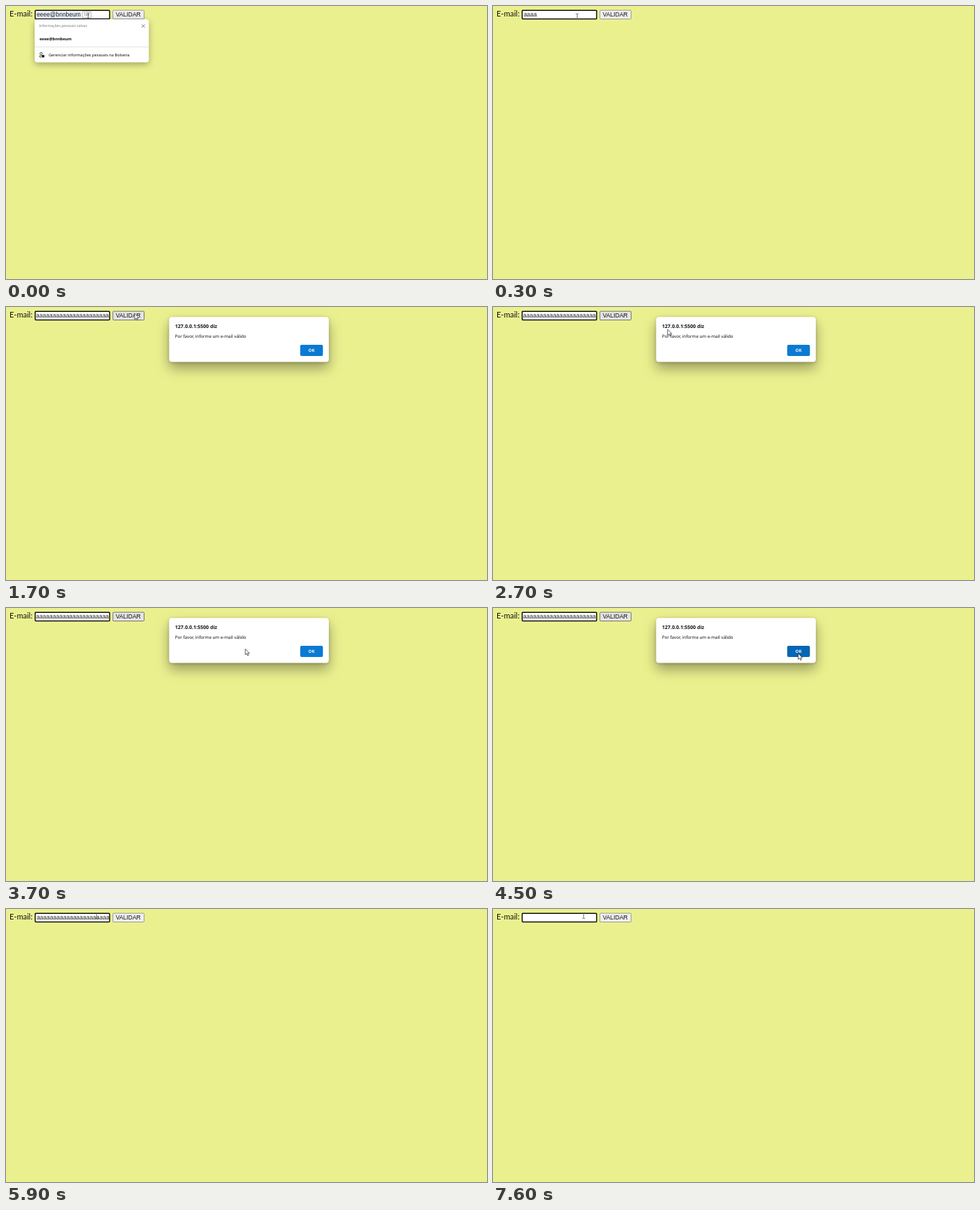
Write an HTML page that moves like this. It is 688 by 390 pixels and loops after 8000 ms.

```html
<!DOCTYPE html>
<html lang="pt-BR">
<head>
<meta charset="utf-8">
<title>Validar e-mail</title>
<style>
  html, body { margin: 0; width: 100%; height: 100%; overflow: hidden; background: #ebf08f; }
  svg { display: block; width: 688px; height: 390px; }
  text { font-family: "Noto Sans", "Open Sans", sans-serif; fill: #111; white-space: pre; }
  .form { font: 8.5px "Liberation Sans", Arial, sans-serif; }
  .label { font: 11px Lato, sans-serif; fill: #111; }
  .bold { font-weight: 700; }
  #popup { filter: drop-shadow(0 3px 5px rgba(0, 0, 0, .32)); }
  #dialog { filter: drop-shadow(0 1px 2px rgba(0, 0, 0, .22)) drop-shadow(0 9px 9px rgba(0, 0, 0, .34)); }
  #popup text, #dialog text { text-rendering: geometricPrecision; }
</style>
</head>
<body>
<svg viewBox="0 0 688 390">
  <text class="label" x="5" y="15">E-mail:</text>

  <rect x="41.7" y="6.2" width="106.6" height="12.2" rx="1.2" fill="#fff" stroke="#101010" stroke-width="1.5"/>
  <rect id="mark" x="43.5" y="7.5" width="63.5" height="9.6" fill="#e8f0fe"/>
  <text id="value" class="form" x="44" y="15"></text>
  <path id="caret" d="M147.3 7.5V17" stroke="#222" stroke-width=".7"/>
  <g id="tip">
    <rect x="109" y="8" width="13" height="9" rx="1.5" fill="#fafafa" stroke="#999" stroke-width=".7"/>
    <text x="111.3" y="14.3" font-size="5" style="fill:#777">Tab</text>
  </g>

  <rect id="button" x="152.9" y="6.1" width="44.7" height="12.5" rx="1.2" stroke-width=".8"/>
  <text class="form" x="157" y="15">VALIDAR</text>

  <g id="popup">
    <rect x="41" y="19" width="163.3" height="61.5" rx="4" fill="#fff"/>
    <text x="47.3" y="30.4" font-size="5.15" style="fill:#777">Informações pessoais salvas</text>
    <path d="M194 26.3l4.6 4.6m0-4.6l-4.6 4.6" stroke="#444" stroke-width=".7"/>
    <text class="bold" x="48" y="48.7" font-size="5.7">eeee@bnnbeum</text>
    <path d="M41 58.5H204.3" stroke="#dcdcdc" stroke-width=".8"/>
    <g fill="none" stroke="#222" stroke-width=".8">
      <circle cx="50.3" cy="68" r="1.7"/>
      <path d="M50.5 71.2H48v1.2q.6 1 2.5 1"/>
      <rect x="51.4" y="70.4" width="3" height="2.6" fill="#222"/>
    </g>
    <text x="61" y="72" font-size="5.66">Gerenciar informações pessoais na Bolseira</text>
  </g>

  <g id="dialog">
    <rect x="233.3" y="14.3" width="228.5" height="64.3" rx="4" fill="#fff"/>
    <text class="bold" x="241.8" y="30" font-size="7.05">127.0.0.1:5500 diz</text>
    <text x="241.8" y="44.3" font-size="6.2">Por favor, informe um e-mail válido</text>
    <rect id="ok" x="420.8" y="54" width="32.5" height="16" rx="2"/>
    <text class="bold" x="437" y="64.2" font-size="6" text-anchor="middle" style="fill:#fff">OK</text>
  </g>

  <path id="beam" d="M-2-4Q0-4 0-3Q0-4 2-4M0-3V3M-2 4Q0 4 0 3Q0 4 2 4" fill="none" stroke="#555" stroke-width=".8"/>
  <path id="arrow" d="M0 0V8.4L2 6.6L3.3 9.6L4.7 9L3.4 6.1H6Z" fill="#fff" stroke="#222" stroke-width=".7"/>
</svg>
<script>
const LOOP = 8000, STEP = 100, FULL = 22;
const $ = id => document.getElementById(id);
const show = (id, on) => $(id).setAttribute("visibility", on ? "visible" : "hidden");
const set = (id, attrs) => { for (const k in attrs) $(id).setAttribute(k, attrs[k]); };

// Pointer path: time, x, y
const path = [
  [0, 117.5, 14], [100, 117.5, 14], [1000, 130.5, 18.5], [1500, 184, 9.3], [2100, 184, 9.3],
  [2700, 249.7, 32], [3000, 266.5, 53.2], [3100, 268, 53.8], [3300, 268, 53.8],
  [4200, 435, 64.3], [4300, 436.5, 65], [4800, 436.5, 65], [5600, 129.7, 9.7], [LOOP, 129.7, 9.7]
];

function pointer(t) {
  const i = path.findIndex(p => p[0] > t);
  const [a, b] = [path[i - 1], path[i]];
  const f = (t - a[0]) / (b[0] - a[0]);
  return [1, 2].map(k => a[k] + (b[k] - a[k]) * f);
}

function fieldText(t) {
  if (t < 200) return "eeee@bnnbeum";
  if (t >= 7500) return "";
  return "a".repeat(Math.min(FULL, 1 + Math.round((t - 200) / 800 * (FULL - 1))));
}

function draw(t) {
  const [x, y] = pointer(t);
  const early = t < 200, selected = t >= 6500 && t < 7500;
  const modal = t >= 1700 && t < 4600;
  const text = fieldText(t);

  $("value").textContent = text;
  set("value", { x: text.length === FULL && t < 5800 ? 43.1 : 43.9 });
  $("value").style.fill = selected ? "#fff" : "#222";
  set("mark", { fill: selected ? "#0078d7" : "#e8f0fe", width: selected ? 103.8 : 63.5 });
  show("mark", early || selected);
  show("caret", t >= 1000 && t < 1500);
  show("tip", early);
  show("popup", early);
  show("dialog", modal);

  const hover = modal || (x > 152 && x < 198 && y < 19);
  set("button", { fill: hover ? "#e4e4e4" : "#efefef", stroke: hover ? "#555" : "#858585" });
  set("ok", { fill: x > 420 && y > 54 ? "#0566b4" : "#0b7ad3" });

  const inField = x < 149;
  show("beam", inField);
  show("arrow", !inField);
  set(inField ? "beam" : "arrow", { transform: `translate(${x} ${y})` });
}

const start = performance.now();
function tick() {
  const t = (performance.now() - start) % LOOP;
  draw(Math.floor(t / STEP) * STEP);
  requestAnimationFrame(tick);
}
tick();
</script>
</body>
</html>
```
